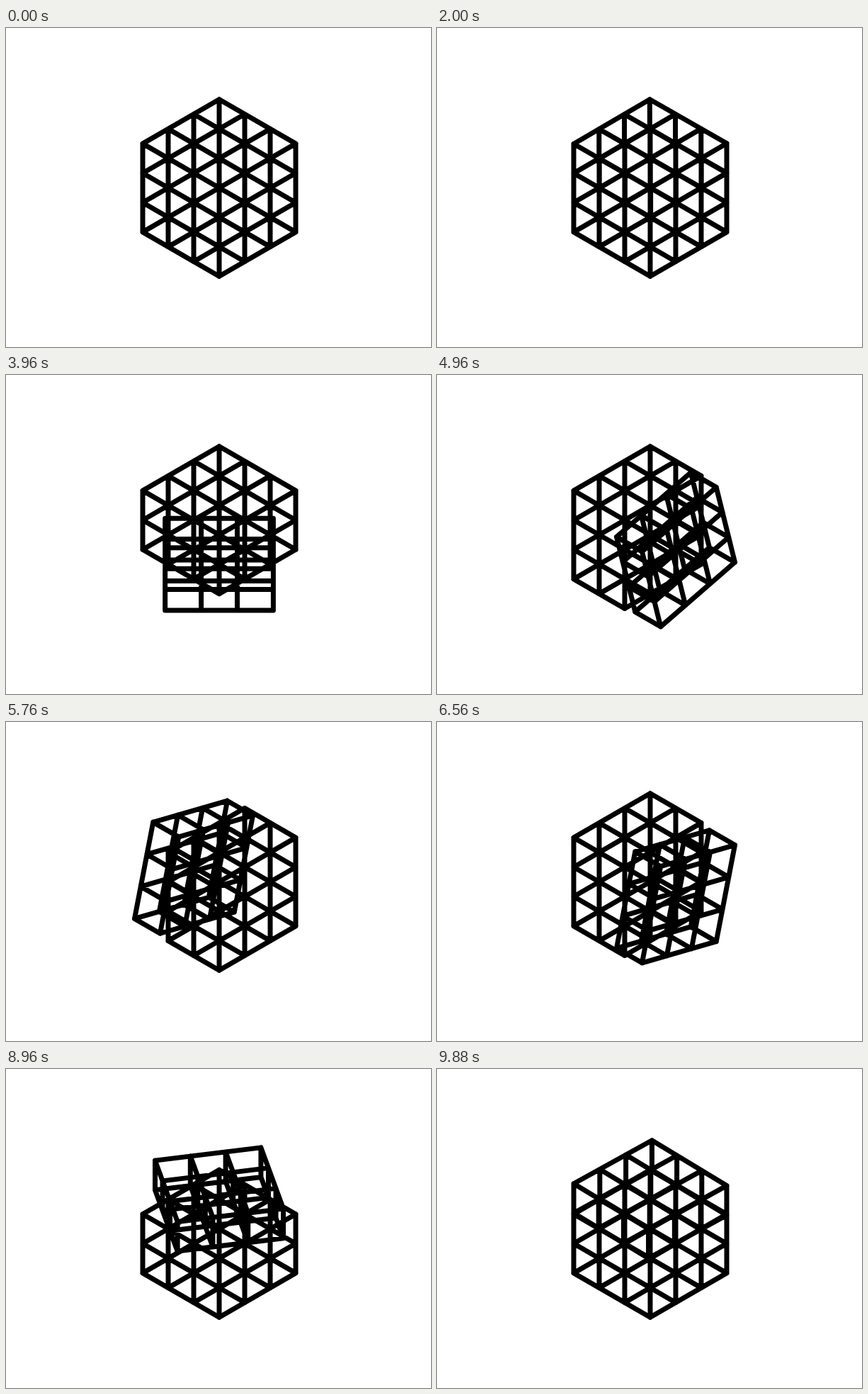
These frames come from a looping animation (600 px wide and 450 px high, 9.92 s). An HTML page with a canvas:

```html
<!DOCTYPE html>
<html>
<head>
<meta charset="utf-8">
<title>Wireframe cube</title>
<style>
html, body { margin: 0; width: 100%; height: 100%; overflow: hidden; background: #fff; }
canvas { display: block; }
</style>
</head>
<body>
<canvas id="stage" width="600" height="450"></canvas>
<script>
const ctx = document.getElementById('stage').getContext('2d');
const LOOP = 9920, STEP = 40, HOLD = 2000, START = 1960;
const UNIT = 41.57, CX = 301, CY = 225.5;

// axis (x, y, z), side of the cube, turn in degrees, duration in ms
const moves = [
  [1, 1, 180, 1600],
  [1, -1, 90, 800],
  [0, 1, -90, 800],
  [0, -1, 90, 800],
  [0, 1, 90, 800],
  [0, -1, -90, 800],
  [1, -1, -90, 800],
  [1, 1, 180, 1600]
];

const smooth = u => u * u * (3 - 2 * u);

function project([x, y, z]) {
  return [
    CX + (x - z) * UNIT * Math.sqrt(3) / 2,
    CY + (x + z) * UNIT / 2 - y * UNIT
  ];
}

function turn(p, axis, angle) {
  const b = (axis + 1) % 3, c = (axis + 2) % 3, q = [...p];
  const cos = Math.cos(angle), sin = Math.sin(angle);
  q[b] = p[b] * cos - p[c] * sin;
  q[c] = p[b] * sin + p[c] * cos;
  return q;
}

// Grid lines of the block between lo and hi along one axis
function block(axis, lo, hi, angle) {
  const from = [-1.5, -1.5, -1.5], to = [1.5, 1.5, 1.5];
  from[axis] = lo;
  to[axis] = hi;
  for (let d = 0; d < 3; d++) {
    const b = (d + 1) % 3, c = (d + 2) % 3;
    for (let i = from[b]; i <= to[b]; i++) {
      for (let j = from[c]; j <= to[c]; j++) {
        const p = [], q = [];
        p[d] = from[d];
        q[d] = to[d];
        p[b] = q[b] = i;
        p[c] = q[c] = j;
        ctx.moveTo(...project(turn(p, axis, angle)));
        ctx.lineTo(...project(turn(q, axis, angle)));
      }
    }
  }
}

function draw(t) {
  ctx.fillStyle = '#fff';
  ctx.fillRect(0, 0, 600, 450);
  ctx.strokeStyle = '#000';
  ctx.lineWidth = 7;
  ctx.lineCap = 'round';
  ctx.beginPath();
  if (t < HOLD) {
    block(0, -1.5, 1.5, 0);
  } else {
    let time = t - START, k = 0;
    while (time >= moves[k][3]) time -= moves[k++][3];
    const [axis, side, degrees, duration] = moves[k];
    const angle = degrees * Math.PI / 180 * smooth(time / duration);
    if (side > 0) {
      block(axis, -1.5, 0.5, 0);
      block(axis, 0.5, 1.5, angle);
    } else {
      block(axis, -0.5, 1.5, 0);
      block(axis, -1.5, -0.5, angle);
    }
  }
  ctx.stroke();
}

const begin = performance.now();
function frame() {
  const t = Math.max(0, performance.now() - begin) % LOOP;
  draw(Math.floor(t / STEP) * STEP);
  requestAnimationFrame(frame);
}
frame();
</script>
</body>
</html>
```
